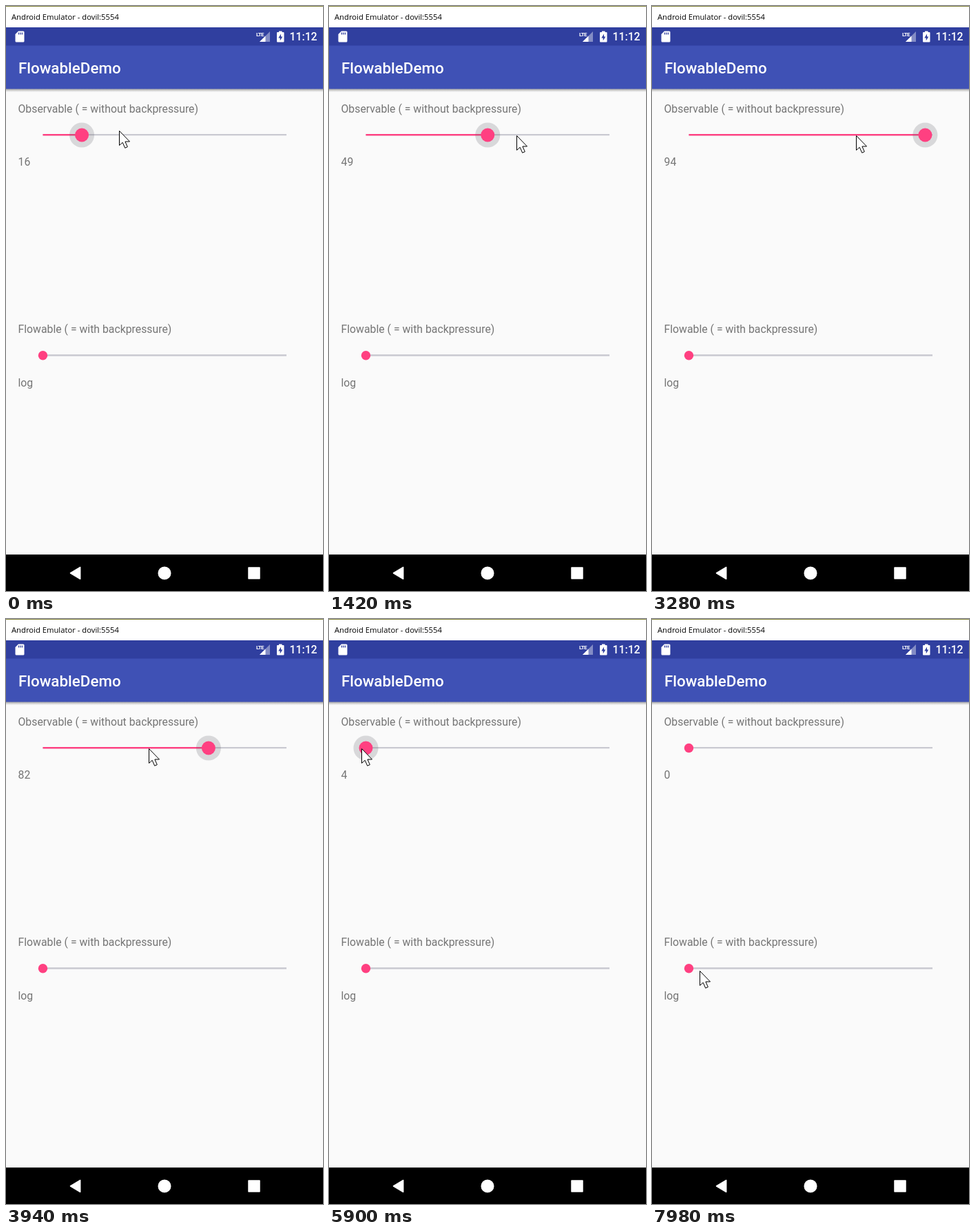
These frames come from a looping animation (460 by 850 pixels, 8 s). An HTML page:

```html
<!DOCTYPE html>
<html lang="en">
<head>
<meta charset="utf-8">
<title>FlowableDemo</title>
<style>
  html, body { margin: 0; width: 100%; height: 100%; overflow: hidden; background: #fafafa; }
  svg { display: block; width: 460px; height: 850px; font-family: Roboto, sans-serif; }
  .label { font-size: 15.8px; fill: #757575; }
  .track { stroke: #c9c9d1; stroke-width: 2.3; }
  .accent { fill: #ff4081; }
</style>
</head>
<body>
<svg viewBox="0 0 460 850">
  <defs>
    <linearGradient id="shade" x2="0" y2="1">
      <stop offset="0" stop-color="#555" stop-opacity=".55"/>
      <stop offset="1" stop-color="#555" stop-opacity="0"/>
    </linearGradient>
  </defs>
  <rect width="460" height="850" fill="#fafafa"/>

  <!-- window title -->
  <rect width="460" height="31" fill="#fff"/>
  <rect width="460" height="1" fill="#85853a"/>
  <text x="8" y="20" font-size="11.25" font-family="Open Sans, sans-serif">Android Emulator - dovil:5554</text>

  <!-- status bar -->
  <rect y="31" width="460" height="27" fill="#303f9f"/>
  <path d="M18 36.5H25Q26.5 36.5 26.5 38V51Q26.5 52.5 25 52.5H15Q13.5 52.5 13.5 51V41Z" fill="#fff"/>
  <path d="M18.5 38.5V41.5M21 38.5V41.5M23.5 38.5V41.5" stroke="#303f9f" stroke-width="1.3"/>
  <text x="363" y="43.5" font-size="8" font-weight="700" fill="#fff" letter-spacing="-.8">LTE</text>
  <path d="M383 37V52H368Z" fill="#838cc5"/>
  <path d="M376.5 43.5V52H368Z" fill="#fff"/>
  <path d="M396 36.5H400.5V38H402.5Q403.5 38 403.5 39V51.5Q403.5 52.5 402.5 52.5H394Q393 52.5 393 51.5V39Q393 38 394 38H396Z" fill="#fff"/>
  <path d="M399 40.5L395.3 46.5H397.7V50.5L401.3 44.5H399Z" fill="#303f9f"/>
  <text x="411.5" y="50" font-size="15.8" font-weight="500" fill="#fff">11:12</text>

  <!-- app bar -->
  <rect y="120" width="460" height="5" fill="url(#shade)"/>
  <rect y="57.5" width="460" height="63" fill="#3f51b5"/>
  <text x="17.9" y="97.7" font-size="22.4" font-weight="500" fill="#fff">FlowableDemo</text>

  <!-- content -->
  <g class="label">
    <text x="17.5" y="155">Observable ( = without backpressure)</text>
    <text id="log" x="17.5" y="232">16</text>
    <text x="17.5" y="475.3">Flowable ( = with backpressure)</text>
    <text x="17.5" y="552.5">log</text>
  </g>
  <path class="track" d="M53.5 187.2H407M53.5 507.5H407"/>
  <rect id="bar" class="accent" x="53.5" y="186" height="2.4"/>
  <circle id="halo" cy="187.5" r="18" fill="#606068"/>
  <circle id="thumb" class="accent" cy="187.5"/>
  <circle class="accent" cx="53.5" cy="507.8" r="6.7"/>

  <!-- navigation bar -->
  <rect y="797" width="460" height="53"/>
  <g fill="#fff" stroke="#fff" stroke-width="1.5" stroke-linejoin="round">
    <path d="M93.5 824L107.7 815.5V832.5Z"/>
    <circle cx="230" cy="824" r="8.8"/>
    <rect x="352" y="816" width="16" height="16"/>
  </g>

  <path id="cursor" d="M.5 .5V21.5L5.2 17.3L8.7 25.3L12.3 23.7L8.9 16H15.5Z" fill="#fff" stroke="#000"/>
</svg>
<script>
const LOOP = 8000, STEP = 40, PER_CENT = 3.535;
const [log, bar, halo, thumb, cursor] =
  ['log', 'bar', 'halo', 'thumb', 'cursor'].map(id => document.getElementById(id));

// Progress from 0 to 1 between two times
const easeIn = (t, from, to, power = 1) =>
  Math.min(1, Math.max(0, (t - from) / (to - from))) ** power;
const easeOut = (t, from, to, power) => 1 - (1 - easeIn(t, from, to)) ** power;

// Drag right, drag back, then move down to the second slider
const pointerX = t => 164 + 241 * easeIn(t, 0, 2590, 1.3) - 358 * easeOut(t, 2590, 5800, 1.5)
  + 5 * easeIn(t, 6240, 7280) + 17 * easeIn(t, 7560, 7960);
const pointerY = t => 181 + 7 * easeIn(t, 0, 400) + 382 * easeOut(t, 6240, 6800, 1.5)
  - 59 * easeIn(t, 6960, 7280);

// The thumb lags the pointer, and the log lags the thumb
const progress = t => 16 + 84 * easeIn(t, 0, 2900, 1.24) - 100 * easeIn(t, 3210, 5420);
const logged = t => 16 + 84 * easeIn(t, 0, 3520) - 100 * easeOut(t, 3560, 6100, 1.33);

function draw(now) {
  const t = Math.floor(now % LOOP / STEP) * STEP;
  const width = Math.round(progress(t)) * PER_CENT;
  const held = 1 - easeIn(t, 6080, 6280);

  bar.setAttribute('width', width);
  for (const c of [halo, thumb]) c.setAttribute('cx', 53.5 + width);
  thumb.setAttribute('r', 6.7 + 3.3 * held);
  halo.setAttribute('opacity', 0.22 * held);
  log.textContent = Math.round(logged(t));
  cursor.setAttribute('transform',
    `translate(${Math.round(pointerX(t))} ${Math.round(pointerY(t))})`);
}

const start = performance.now();
function tick() {
  draw(performance.now() - start);
  requestAnimationFrame(tick);
}
tick();
</script>
</body>
</html>
```
